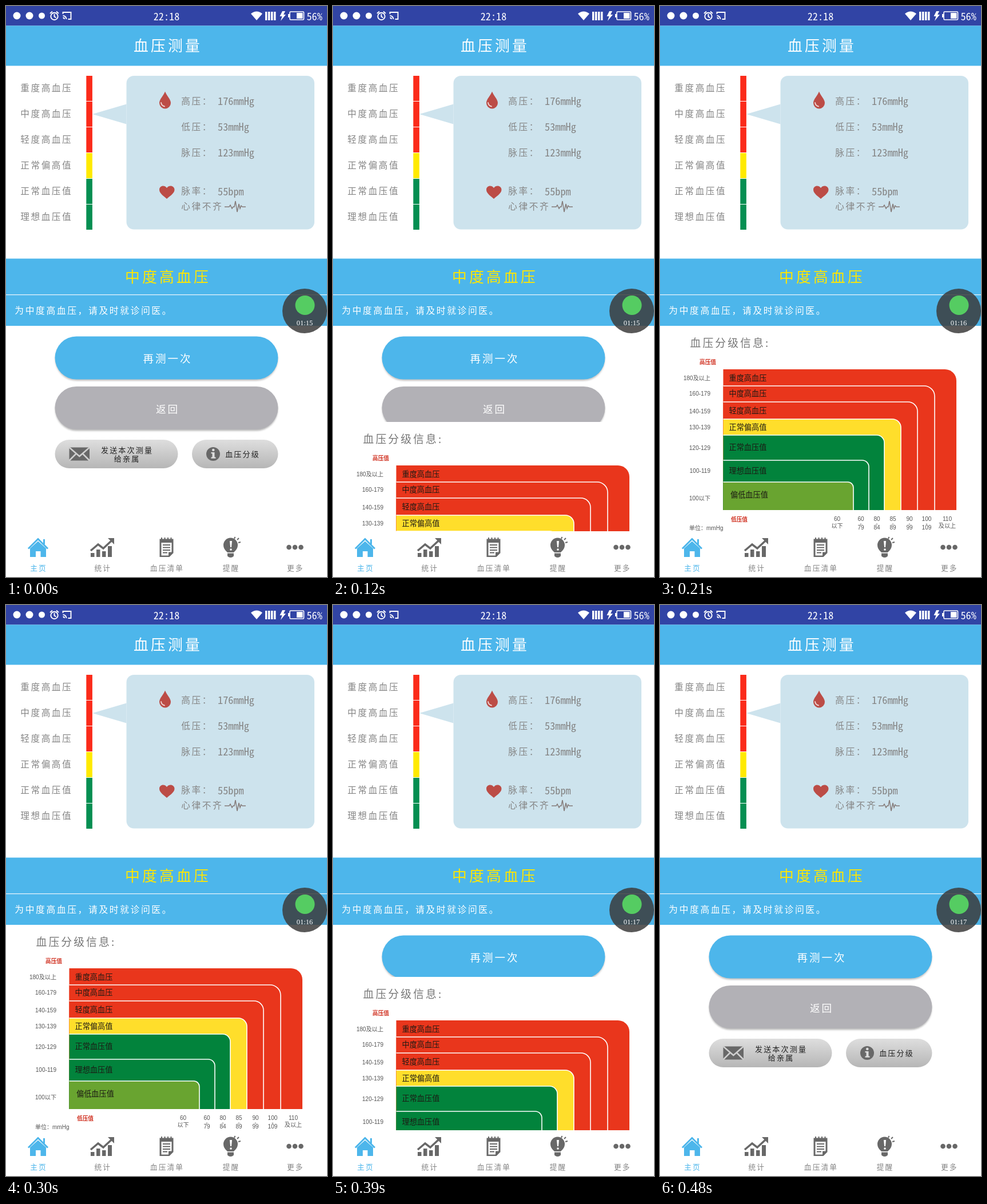
Recreate the animation shown at these times as an HTML page. Size 561 px wide and 998 px high, loop 510 ms.

```html
<!DOCTYPE html>
<html lang="zh-CN">
<head>
<meta charset="utf-8">
<title>血压测量</title>
<style>
html, body { margin: 0; width: 100%; height: 100%; overflow: hidden; background: #fff; }
svg { display: block; width: 561px; height: 998px; }
text { white-space: pre; }
.cjk { font-family: 'Noto Sans CJK SC', 'Noto Sans CJK JP', sans-serif; }
.hand { font-family: 'Noto Sans CJK SC', 'Noto Sans CJK JP', sans-serif; font-weight: 300; font-style: oblique 8deg; }
.chart { font-family: 'Liberation Sans', 'Noto Sans CJK SC', sans-serif; }
.serif { font-family: 'Liberation Serif', serif; }
.mono { font-family: 'Noto Sans Mono CJK SC', 'Noto Sans Mono CJK JP', 'Liberation Mono', monospace; font-weight: 300; }
</style>
</head>
<body>
<svg id="stage" viewBox="0 0 561 998">
  <defs>
    <linearGradient id="silver" x1="0" y1="0" x2="0" y2="1">
      <stop offset="0" stop-color="#dedede"/><stop offset="1" stop-color="#b6b6b6"/>
    </linearGradient>
    <filter id="soft" x="-5%" y="-10%" width="110%" height="130%"><feGaussianBlur stdDeviation="1.5"/></filter>
    <clipPath id="view"><rect y="559" width="561" height="359"/></clipPath>
  </defs>
  <rect width="561" height="998" fill="#fff"/>

  <g id="status" fill="#fff">
    <rect width="561" height="34.5" fill="#3144a5"/>
    <circle cx="19" cy="17" r="6.5"/><circle cx="41" cy="17" r="6.5"/><circle cx="62.5" cy="17" r="5.5"/>
    <g fill="none" stroke="#fff" stroke-width="1.9">
      <circle cx="84.5" cy="18" r="6.2"/>
      <path d="M84.5 14v4.500l3 2M77 13l4-3.500M92 13l-4-3.500"/>
      <path d="M99.500 14v-3h14v12h-5M99.500 17a6 6 0 0 1 6 6M99.500 20.500a2.500 2.500 0 0 1 2.500 2.500"/>
    </g>
    <path d="M428 13.500q10-8 20 0l-10 11.500z"/>
    <path d="M453 10h3.500v15h-3.500zM458 10h3.500v15h-3.500zM463 10h3.500v15h-3.500zM468 10h3.500v15h-3.500z"/>
    <path d="M483 9h5l-3 6h4l-9 11 2.500-8h-4z"/>
    <rect x="496" y="10" width="24.500" height="14" rx="1.500" fill="none" stroke="#fff" stroke-width="1.6"/>
    <path d="M493 14h3v6h-3zM508 12h10.500v10h-10.500z"/>
  </g>

  <rect y="34.5" width="561" height="70" fill="#4db6eb"/>
  <g id="levels"></g>
  <path d="M151 189L210.500 171.500V206.500Z" fill="#cde3ed"/>
  <rect x="210.5" y="122" width="328.5" height="268.5" rx="13" fill="#cde3ed"/>
  <path d="M278 149.500C281 157 288 163 288 169.500A10 10 0 0 1 268 169.500C268 163 275 157 278 149.500Z" fill="#bc4c46"/>
  <path d="M271 169q1 5.500 6 6.500" fill="none" stroke="#f0d5d3" stroke-width="1.8" stroke-linecap="round"/>
  <path d="M281 337C274 331 268 327 268 321C268 314 277 312 281 318C285 312 294.500 314 294.500 321C294.500 327 288 331 281 337Z" fill="#bc4c46"/>
  <path d="M382 351h8l2-3 3 6 2-3h2l2-10 3 19 3-14 2 8 2-5 2 2h6" fill="none" stroke="#857b79" stroke-width="1.5"/>

  <rect y="441.5" width="561" height="117.5" fill="#4db6eb"/>
  <rect y="504" width="561" height="1.3" fill="#e3f3fb"/>

  <g id="buttons">
    <rect x="86" y="580" width="389" height="75" rx="37.5" fill="#999" opacity=".6" filter="url(#soft)"/>
    <rect x="85.5" y="577.5" width="390" height="75" rx="37.5" fill="#4db6eb"/>
    <rect x="86" y="667.5" width="389" height="75" rx="37.5" fill="#888" opacity=".6" filter="url(#soft)"/>
    <rect x="85.5" y="665" width="390" height="75" rx="37.5" fill="#b2b1b6"/>
    <rect x="85.5" y="758" width="215" height="50" rx="25" fill="url(#silver)"/>
    <rect x="325" y="758" width="150.500" height="50" rx="25" fill="url(#silver)"/>
    <rect x="110.5" y="771.5" width="35.5" height="23" fill="#686868"/>
    <path d="M110.500 771.500L128.300 787L146 771.500M110.500 794.500L123 782M146 794.500L133.500 782" fill="none" stroke="#cfcfcf" stroke-width="2.5"/>
    <circle cx="362" cy="783" r="12" fill="#686868"/>
    <path d="M358.500 780h6v8.500h2v2.200h-8v-2.200h2v-6.300h-2z" fill="#ddd"/><circle cx="362.3" cy="776" r="2.3" fill="#ddd"/>
  </g>

  <g clip-path="url(#view)"><g id="sheet"><rect y="559" width="561" height="360" fill="#fff"/></g></g>

  <g id="tabs" fill="#686868">
    <rect y="918" width="561" height="80" fill="#fff"/>
    <g fill="#4db6eb">
      <path d="M56 935.500L70 948v15h-9.500v-10h-8.500v10H42V948Z"/>
      <path d="M39 948.500L56 931.500 73 948.500M66.500 932v9" fill="none" stroke="#4db6eb" stroke-width="3"/>
    </g>
    <path d="M148 956h6.500v7h-6.500zM158 950h6.500v13h-6.500zM168 953h6.500v10h-6.500zM178 944h7v19h-7zM178 930h11v11z"/>
    <path d="M148 952l13-11 9 7 15-14" fill="none" stroke="#686868" stroke-width="3.5"/>
    <path d="M268.500 931.500H292.500V956L285.500 963H268.500ZM271.500 938V960.500H284V954.500H289.500V938Z" fill-rule="evenodd"/>
    <path d="M272 929v6M277.500 929v6M283 929v6M288.500 929v6" stroke="#686868" stroke-width="2"/>
    <path d="M274 942h13M274 946.500h13M274 951h13M274 955.500h8" stroke="#686868" stroke-width="2"/>
    <path d="M387 955C383 951 380 948 380 942A12.500 12.500 0 0 1 405 942C405 948 402 951 398 955ZM387 956.500h11v5q-5.500 5-11 0z"/>
    <path d="M391 935h4l-1 11h-2z" fill="#fff"/><circle cx="393" cy="950" r="1.8" fill="#fff"/>
    <path d="M399 931l1.500-3M404 933l3-3M406 938l4-1" stroke="#686868" stroke-width="2"/>
    <circle cx="494.500" cy="946" r="4.3"/><circle cx="505" cy="946" r="4.3"/><circle cx="515.500" cy="946" r="4.3"/>
  </g>

  <g id="bubble">
    <circle cx="522" cy="533" r="39" fill="#3c3c3c" opacity=".85"/>
    <circle cx="522.5" cy="523" r="17" fill="#55cc62"/>
  </g>
</svg>
<script>
const NS = 'http://www.w3.org/2000/svg';
const $ = id => document.getElementById(id);

function add(parent, tag, attrs) {
  const el = document.createElementNS(NS, tag);
  for (const k in attrs) el.setAttribute(k, attrs[k]);
  return parent.appendChild(el);
}

// Text placed by the vertical middle of its glyphs.
function label(parent, str, x, mid, size, fill, opts = {}) {
  const el = add(parent, 'text', {
    x, y: mid + size * 0.37, 'font-size': size, fill, class: 'cjk', ...opts
  });
  el.textContent = str;
  return el;
}

// Small, loosely set script; pitch is the advance of one character.
function script(parent, str, x, mid, pitch, fill, opts = {}) {
  const gap = pitch * 0.14;
  return label(parent, str, x + gap / 2, mid, pitch - gap, fill, { class: 'hand', 'letter-spacing': gap, ...opts });
}

const center = { 'text-anchor': 'middle' };
const mono = { class: 'mono' };
const stage = $('stage'), sheet = $('sheet'), status = $('status');
const gray = '#858585';

label(status, '22:18', 280.5, 18.5, 18.2, '#fff', { ...mono, ...center });
label(status, '56%', 525.5, 18.5, 18.2, '#fff', mono);
script($('levels'), '血压测量', 281, 69, 30, '#fff', center);

const levels = ['重度高血压', '中度高血压', '轻度高血压', '正常偏高值', '正常血压值', '理想血压值'];
const barColors = ['#fb2b1a', '#fb2b1a', '#fb2b1a', '#ffea00', '#058f52', '#058f52'];
levels.forEach((name, i) => {
  const y = 122 + i * 45;
  script($('levels'), name, 24, y + 21.5, 18.2, gray);
  add($('levels'), 'rect', { x: 140.3, y, width: 10.6, height: 44, fill: barColors[i] });
});

[['高压：', '176mmHg', 166], ['低压：', '53mmHg', 211],
 ['脉压：', '123mmHg', 256], ['脉率：', '55bpm', 323.5]].forEach(([name, value, y]) => {
  script(stage, name, 305, y, 18.2, gray);
  label(stage, value, 370, y + 0.5, 18.3, gray, mono);
});
script(stage, '心律不齐', 305, 350.5, 18.3, gray);
script(stage, '中度高血压', 281, 473.5, 30, '#ffe600', center);
script(stage, '为中度高血压，请及时就诊问医。', 14, 532, 18.4, '#fff');

const buttons = $('buttons');
script(buttons, '再测一次', 281, 616, 21.5, '#fff', center);
script(buttons, '返回', 281, 704, 20.5, '#fff', center);
script(buttons, '发送本次测量', 210.5, 776, 15.2, '#222', center);
script(buttons, '给亲属', 210.5, 791.5, 15.2, '#222', center);
script(buttons, '血压分级', 412.5, 783.5, 15.2, '#222', center);

['主页', '统计', '血压清单', '提醒', '更多'].forEach((name, i) =>
  script($('tabs'), name, 56 + i * 112.2, 982, 14.8, i ? gray : '#4db6eb', center));

// Grading sheet, drawn at its raised position.
script(sheet, '血压分级信息:', 51, 589, 21.9, '#777');
const red = '#e9361c', green = '#02833c';
const bold = { style: 'font-weight:700' };
label(sheet, '高压值', 69, 622, 9.7, '#d03020', bold);
label(sheet, '低压值', 124, 897, 9.7, '#d03020', bold);
label(sheet, '单位：mmHg', 51, 912, 10, '#555', { class: 'chart' });

// name, top, right, fill, text middle, range, range middle
[['重度高血压', 635, 518, red, 650, '180及以上', 650],
 ['中度高血压', 664, 480, red, 677, '160-179', 677.5],
 ['轻度高血压', 692, 450, red, 707.5, '140-159', 708],
 ['正常偏高值', 722, 421, '#ffde2b', 736, '130-139', 736.5],
 ['正常血压值', 750, 392, green, 771.5, '120-129', 772],
 ['理想血压值', 794, 365, green, 812.5, '100-119', 812.5],
 ['偏低血压值', 832, 338, '#69a430', 854.5, '100以下', 860.5]
].forEach(([name, top, right, fill, mid, range, rangeMid], i) => {
  const r = 20 - i * 1.7;
  const edge = `M110.500 ${top}H${right - r}A${r} ${r} 0 0 1 ${right} ${top + r}V881`;
  add(sheet, 'path', { d: edge + 'H110.500Z', fill });
  if (i) add(sheet, 'path', { d: edge, fill: 'none', stroke: '#fff', 'stroke-width': 1.6 });
  label(sheet, name, i === 6 ? 123 : 120.5, mid, 13.2, '#1c1a14');
  label(sheet, range, 88, rangeMid, 10.1, '#555', { class: 'chart', 'text-anchor': 'end' });
});

[[309.5, '60', '以下'], [351, '60', '79'], [379, '80', '84'], [407, '85', '89'],
 [436, '90', '99'], [466, '100', '109'], [502, '110', '及以上']].forEach(([x, a, b]) => {
  const opts = { class: 'chart', ...center };
  const range = /\d/.test(b);
  label(sheet, a, x, 896, 10.1, '#555', opts);
  if (range) label(sheet, '-', x, 904, 10.1, '#555', opts);
  label(sheet, b, x, range ? 911.5 : 908.5, 10.1, '#555', opts);
});

const clock = label($('bubble'), '01:15', 522, 553, 12.5, '#fff', { class: 'serif', ...center });

const LOOP = 510, STEP = 30, TRAVEL = 359;
const ease = u => (1 - Math.cos(Math.PI * Math.min(1, Math.max(0, u)))) / 2;

function draw(ms) {
  const t = Math.floor((ms % LOOP) / STEP) * STEP;
  const raised = ease((t - 56.8) / 121.5) - ease((t - 341.7) / 144);
  sheet.setAttribute('transform', `translate(0 ${Math.round(TRAVEL * (1 - raised))})`);
  clock.textContent = t < 150 ? '01:15' : t < 390 ? '01:16' : '01:17';
}

const start = performance.now();
function tick() {
  draw(performance.now() - start);
  requestAnimationFrame(tick);
}
draw(0);
requestAnimationFrame(tick);
</script>
</body>
</html>
```
